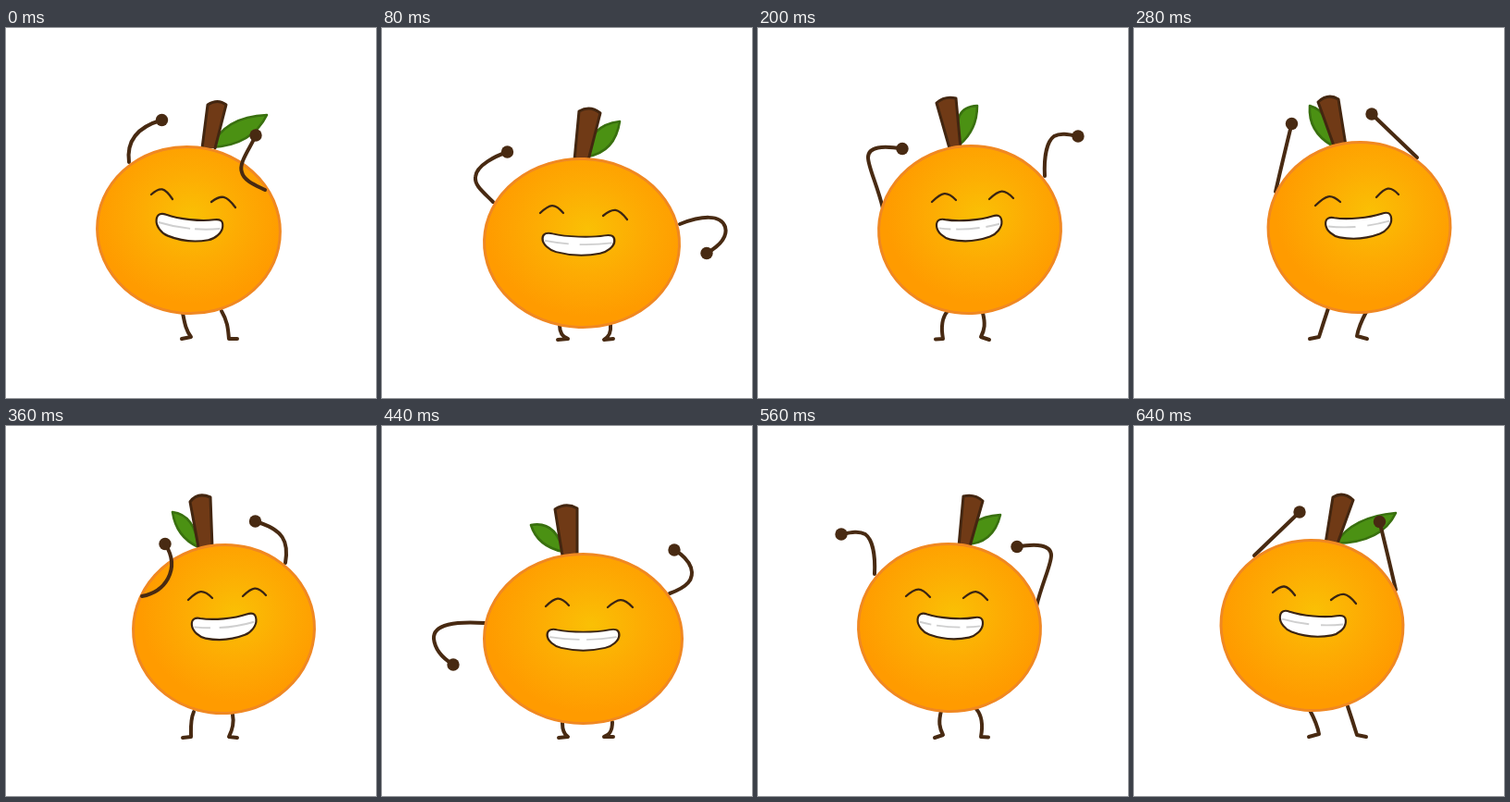
Write an HTML page that moves like this. It is 400 by 400 pixels and loops after 0.72 s.

```html
<!DOCTYPE html>
<html lang="en">
<head>
<meta charset="utf-8">
<title>Dancing orange</title>
<style>
html, body { margin: 0; width: 100%; height: 100%; overflow: hidden; background: #fff; }
svg { display: block; width: 100%; height: 100%; }
path { stroke-linecap: round; stroke-linejoin: round; }
.limb { fill: none; stroke: #482a12; stroke-width: 4; }
.hand { fill: #482a12; }
.line { fill: none; stroke: #3a2413; stroke-width: 2.3; }
</style>
</head>
<body>
<svg viewBox="0 0 400 400">
  <defs>
    <radialGradient id="peel" cy=".42" r=".52">
      <stop offset="0" stop-color="#fac005"/>
      <stop offset=".5" stop-color="#fdac03"/>
      <stop offset="1" stop-color="#ff9b00"/>
    </radialGradient>
  </defs>
  <path id="leaf" fill="#4b9113" stroke="#39700f" stroke-width="2.6"/>
  <path id="stem" fill="#703a16" stroke="#432610" stroke-width="3"/>
  <g id="back"></g>
  <path id="legs" class="limb"/>
  <ellipse id="body" fill="url(#peel)" stroke="#f08822" stroke-width="3"/>
  <path id="brows" class="line"/>
  <g id="mouth">
    <path d="M-36,-4 C-36,-11 -31,-12 -26,-10.5 C-12,-7 12,-7 26,-10.5 C32,-12 36,-11 36,-4 C36,3 29,10 22,12 C8,16 -8,16 -22,12 C-29,10 -36,3 -36,-4Z" fill="#fff" stroke="#3a2413" stroke-width="2.2"/>
    <path id="teeth" d="M-33.5,-1.5 Q0,5 33.5,-1.5" fill="none" stroke="#cfcfcf" stroke-width="2" style="stroke-linecap:butt"/>
  </g>
  <g id="front"></g>
</svg>
<script>
const $ = id => document.getElementById(id);

// body: cx cy rx ry; mouth: x y tilt scaleX scaleY; brows: x y dx dy each
const lean = {
  hold: 80, body: [197.5, 218.5, 99, 90], mouth: [198, 215, 6, 1, 1], dash: '35 5 50',
  brows: [[157, 180, 23, 5], [222, 188, 26, 6]],
  stem: 'M212,130 L218,83 Q229,76 238,83 L226,130',
  leaf: 'M222,129 Q236,96 282,94 Q266,127 222,129Z',
  arms: ['M133,145 C130,122 142,107 168.5,99.5',
         'M280,175 C270,170 257,165 255,156 C251,146 264,130 270,116'],
  front: 1,
  legs: 'M191,308 C193,318 194,326 200,334 L190,336 M233,306 C240,318 240,326 241,336 L250,336'
};
const squashA = {
  hold: 120, body: [216, 232.5, 105.5, 91], mouth: [212.3, 232.5, 2, 1.08, .87], dash: '24 11 50',
  brows: [[171, 200, 25, 0], [239, 203, 26, 4]],
  stem: 'M208,143 L213,90 Q225,83 236,92 L223,143',
  leaf: 'M222,139 Q223,105 257,101 Q252,134 222,139Z',
  arms: ['M120,188 C108,176 100,170 101,161 C102,148 124,138 135.5,134',
         'M322,212 C345,203 366,201 371,215 C374,226 364,236 351,243.5'],
  legs: 'M192,321 C192,330 195,334 201,336 L190,337 M247,321 C248,330 245,334 240,337 L250,336'
};
const swing = {
  hold: 80, body: [229, 218, 98.5, 90.5], mouth: [228.5, 215.5, -4, .98, .97], dash: '13 6 26 7 30',
  brows: [[188, 188, 26, -2], [250, 185, 26, -1]],
  stem: 'M207,130 L193,81 Q202,73 214,76 L219,130',
  leaf: 'M218,126 Q208,85 237,84 Q237,110 218,126Z',
  arms: ['M135,195 C129,170 119,150 119,140 C119,128 135,127 156,130.5',
         'M310,160 C309,140 312,123 320,117 C327,113 336,115 346,117'],
  legs: 'M205,306 C198,314 198,325 200,336 L192,336.5 M243,308 C246,320 245,326 241,334 L250,337'
};
const leanBack = {
  hold: 80, body: [235.5, 219.5, 98, 91], mouth: [236, 216, -5, .97, .98], dash: '18 10 50',
  brows: [[197, 188, 26, -2], [256, 184, 25, -1]],
  stem: 'M208,131 L199,82 Q207,71 221,77 L223,131',
  leaf: 'M208,131 Q204,96 180,93 Q184,120 208,131Z',
  arms: ['M147,184 C158,182 169,176 175,165 C182,152 180,140 172,127.5',
         'M302,148 C306,125 300,112 269.5,103'],
  front: 0,
  legs: 'M203,309 C199,318 200,328 200,336 L191,337 M245,312 C247,322 244,330 241,336 L250,337'
};
const squashB = {
  hold: 120, body: [217.5, 230, 107, 91.5], mouth: [217.5, 229.5, 0, 1.08, .87], dash: '30 7 50',
  brows: [[177, 195, 25, -1], [244, 196, 27, 0]],
  stem: 'M195,140 L187,90 Q199,82 211,89 L211,140',
  leaf: 'M196,136 Q188,102 161,107 Q168,130 196,136Z',
  arms: ['M111,213 C80,211 55,214 56,230 C57,240 64,250 77,258',
         'M311,181 C330,174 338,166 334,153 C331,145 323,138 316,134'],
  legs: 'M195,321 C195,328 196,333 201,336 L191,337 M249,320 C249,330 246,334 240,336 L250,336'
};
const reach = {
  hold: 80, body: [192.5, 215.5, 98.5, 92], mouth: [193, 213, 5, .99, .96], dash: '30 13 50',
  brows: [[150, 180, 24, 3], [213, 188, 27, 4]],
  stem: 'M207,127 L215,77 Q226,70 237,80 L220,127',
  leaf: 'M218,127 Q236,98 283,94 Q268,126 218,127Z',
  arms: ['M130,140 L179,93', 'M283,177 Q274,138 265.5,103.5'],
  legs: 'M190,307 Q198,322 200,333 L189,336 M231,303 Q236,318 241,334 L251,336'
};

const flip = (path, span = 436) =>
  path.replace(/([\d.]+),([\d.]+)/g, (_, x, y) => `${span - x},${y}`);

function mirror(p, leaf) {
  const [cx, ...rest] = p.body, [mx, my, tilt, sx, sy] = p.mouth;
  return {
    ...p, leaf,
    body: [436 - cx, ...rest],
    mouth: [436 - mx, my, -tilt, sx, sy],
    brows: p.brows.map(([x, y, dx, dy]) => [436 - x - dx, y + dy, dx, -dy]),
    stem: flip(p.stem),
    arms: p.arms.map(a => flip(a)),
    legs: flip(p.legs, 441)
  };
}

const poses = [
  lean, squashA, swing,
  mirror(reach, 'M214,127 Q212,90 190,84 Q188,112 214,127Z'),
  leanBack, squashB,
  mirror(swing, 'M219,128 Q226,98 262,96 Q254,130 219,128Z'),
  reach
];
const loop = poses.reduce((sum, p) => sum + p.hold, 0);

const brow = ([x, y, dx, dy]) =>
  `M${x},${y} C${x + .42 * dx},${y + .3 * dy - 10} ${x + .62 * dx},${y + .6 * dy - 11} ${x + dx},${y + dy}`;

function arm(path) {
  const [x, y] = path.match(/[\d.]+/g).slice(-2);
  return `<path class="limb" d="${path}"/><circle class="hand" cx="${x}" cy="${y}" r="6.7"/>`;
}

function set(id, attrs) {
  for (const key in attrs) $(id).setAttribute(key, attrs[key]);
}

function draw(p) {
  const [cx, cy, rx, ry] = p.body, [mx, my, tilt, sx, sy] = p.mouth;
  for (const id of ['leaf', 'stem', 'legs']) set(id, { d: p[id] });
  set('body', { cx, cy, rx, ry, transform: `rotate(${tilt} ${cx} ${cy})` });
  set('peel', { cx: .54 - .006 * tilt });
  set('brows', { d: p.brows.map(brow).join(' ') });
  set('mouth', { transform: `translate(${mx} ${my}) rotate(${tilt}) scale(${sx} ${sy})` });
  set('teeth', { 'stroke-dasharray': p.dash });
  $('back').innerHTML = p.arms.filter((_, i) => i !== p.front).map(arm).join('');
  $('front').innerHTML = p.arms.filter((_, i) => i === p.front).map(arm).join('');
}

function poseAt(ms) {
  let t = ms % loop;
  return poses.find(p => (t -= p.hold) < 0);
}

let shown;
function tick() {
  const pose = poseAt(performance.now());
  if (pose !== shown) draw(shown = pose);
  requestAnimationFrame(tick);
}
tick();
</script>
</body>
</html>
```
